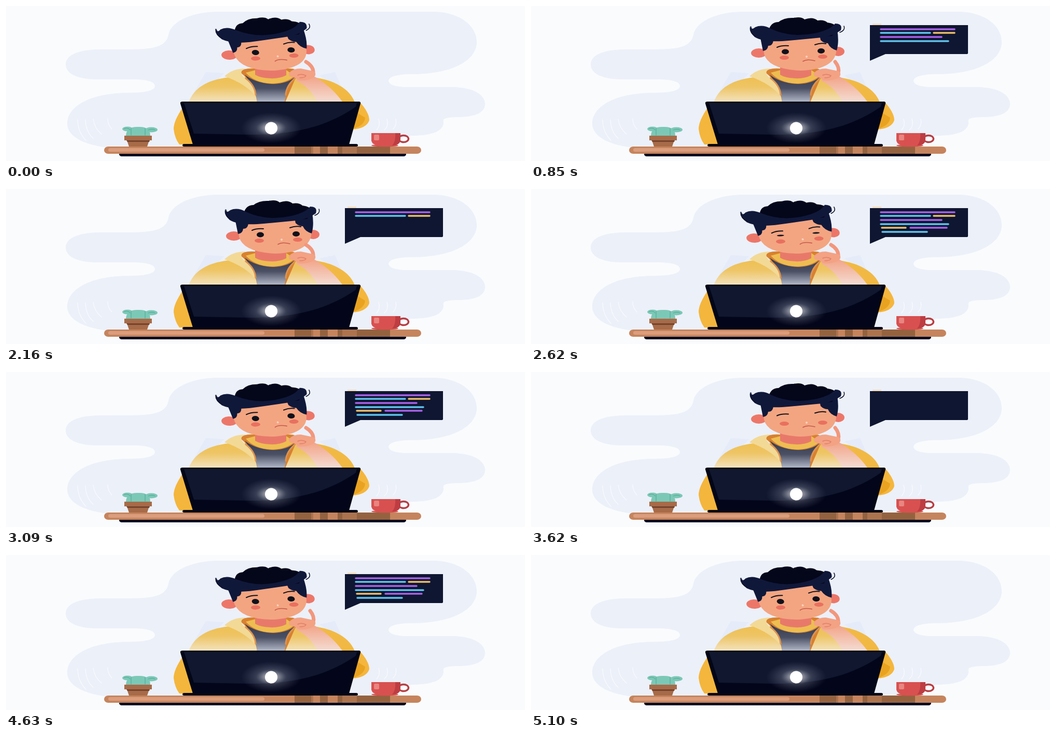
Animation, 1000 px wide and 300 px high, one loop 5170 ms. Source, as an HTML page:

```html
<!DOCTYPE html>
<html lang="en">
<head>
<meta charset="utf-8">
<title>Thinking at the laptop</title>
<style>
  html, body { margin: 0; height: 100%; overflow: hidden; background: #fafbfd; }
  svg { display: block; width: 100vw; height: 100vh; }
  .line { fill: none; stroke-linecap: round; }
</style>
</head>
<body>
<svg viewBox="0 0 1000 300" preserveAspectRatio="none">
  <defs>
    <linearGradient id="cloth" x1="0" y1="0" x2="0" y2="1">
      <stop offset="0" stop-color="#efc052"/><stop offset=".4" stop-color="#eec566"/><stop offset="1" stop-color="#f3e3c0"/>
    </linearGradient>
    <linearGradient id="shirt" x1="0" y1="0" x2="0" y2="1">
      <stop offset="0" stop-color="#34394c"/><stop offset=".5" stop-color="#4b5064"/><stop offset="1" stop-color="#b4bac9"/>
    </linearGradient>
    <linearGradient id="arm" x1="0" y1="0" x2="0" y2="1">
      <stop offset="0" stop-color="#f2a184"/><stop offset="1" stop-color="#f4dcd2"/>
    </linearGradient>
    <radialGradient id="glow">
      <stop offset=".15" stop-color="#fff" stop-opacity=".65"/>
      <stop offset=".5" stop-color="#aeb2c2" stop-opacity=".25"/>
      <stop offset="1" stop-color="#8a90a8" stop-opacity="0"/>
    </radialGradient>
  </defs>

  <!-- backdrop -->
  <path fill="#ecf0f9" d="M313 56C318 28 362 11 410 11H825C874 12 907 38 907 70C907 106 858 132 782 132
    C752 132 737 137 737 145C738 153 752 157 775 157H862C900 158 923 171 923 190C922 208 902 215 868 215
    C845 216 841 218 843 226C842 243 820 251 780 251L700 274H195C145 268 118 250 118 228C118 195 160 168 238 168
    C270 168 287 163 287 155C287 146 270 142 242 142H172C135 141 115 130 115 113C115 95 140 84 182 84H235C288 84 308 78 313 56Z"/>
  <g class="line" stroke="#fff" stroke-width="1.2" opacity=".7">
    <path d="M138 220Q138 244 154 260M153 220Q154 244 168 256M168 219Q170 236 184 248M196 218Q196 230 204 238"/>
    <path d="M714 240Q722 232 718 219M729 240Q738 232 734 219M746 238Q754 230 751 219"/>
  </g>
  <path fill="#e5ebf9" d="M385 128L420 130L370 185H352ZM634 128L604 134L655 176Z"/>

  <!-- body -->
  <path fill="#f4b63c" d="M341 196Q323 222 323 238Q325 256 334 268H366ZM680 184Q700 206 700 221Q695 237 667 239Z"/>
  <path fill="#e9a321" d="M677 207L692 216Q691 231 668 238Z"/>
  <path fill="url(#cloth)" d="M430 138C385 143 362 160 352 186H655Q620 152 590 138Z"/>
  <path fill="#f1b944" d="M592 138C632 143 662 160 672 186H648Q625 153 592 138Z"/>
  <path fill="#d8812f" d="M451 128Q458 119 480 121H545Q560 120 562 130L538 186H484Q478 150 451 128Z"/>
  <path fill="url(#shirt)" d="M460 133Q482 150 515 151Q543 150 557 137Q541 153 537 186H484Q482 163 460 133Z"/>
  <path fill="#eebd52" d="M462 129L481 124Q510 140 540 124L556 135Q540 150 511 150Q480 149 462 129Z"/>
  <path fill="#e8796a" d="M480 112H540V134Q527 141 509 140Q489 139 480 133Z"/>
  <path fill="#f3d996" d="M421 136Q436 121 462 121Q446 126 460 139Q480 154 481 175Q463 151 421 136Z"/>
  <path class="line" stroke="#dd9350" stroke-width="3" d="M462 140Q480 154 481 172M557 140Q540 154 539 172"/>

  <!-- head -->
  <g id="head">
    <ellipse cx="439" cy="91" rx="15" ry="9" fill="#ec7769"/>
    <ellipse cx="592" cy="88" rx="12" ry="9" fill="#ec7769"/>
    <path fill="#f3a581" d="M446 66Q520 44 588 62V90Q582 123 519 125Q456 122 449 92Z"/>
    <path fill="#10183a" d="M442 62L447 87Q456 86 457 77Q467 77 467 64ZM556 56L558 66Q564 72 572 72Q576 82 589 86Q594 70 590 46Z"/>
    <path fill="#04061a" d="M458 47Q462 31 477 31Q488 22 506 23Q521 20 527 26Q543 20 552 28Q565 26 571 32Q588 34 590 44L580 58L470 64Z"/>
    <path fill="#10183a" d="M425 39Q424 48 432 41Q446 35 462 44Q500 62 545 53Q576 47 586 34Q601 34 597 47Q584 57 560 61Q520 65 484 68Q448 70 431 60Q418 49 425 39Z"/>
    <path class="line" stroke="#0b1029" stroke-width="1.5" d="M423 40Q420 51 432 58M595 51Q606 47 603 39"/>
    <g fill="#e9705f">
      <ellipse cx="488" cy="100" rx="9" ry="4"/><ellipse cx="562" cy="98" rx="9" ry="4"/>
    </g>
    <g fill="#11111b">
      <ellipse class="eye" cx="490" cy="88.5" rx="7"/><ellipse class="eye" cx="559" cy="87" rx="7"/>
    </g>
    <path id="brows" class="line" stroke="#11111b" stroke-width="2" d="M474 80Q483 76 496 77M547 75Q558 71 568 73"/>
    <circle cx="531" cy="98" r="2" fill="#fbd2bc"/>
    <path class="line" stroke="#c65a4c" stroke-width="1.6" d="M524 107Q532 102 547 106"/>
  </g>

  <!-- hand -->
  <path fill="url(#arm)" d="M560 136L590 134Q626 154 648 185H600Q585 157 560 145Z"/>
  <path id="finger" class="line" stroke="#f2977d" stroke-width="7"/>
  <path fill="#f3a284" d="M545 130Q552 121 568 121L592 126Q600 131 593 138Q582 145 565 144Q556 137 546 136Z"/>
  <path class="line" stroke="#e27e6a" stroke-width="1.5" d="M562 134Q570 130 578 135Q576 139 566 139"/>

  <!-- desk -->
  <rect x="218" y="283" width="553" height="8" rx="5" fill="#050920"/>
  <rect x="189" y="272" width="611" height="14" rx="8" fill="#c5845d"/>
  <rect x="197" y="275" width="301" height="7" rx="4" fill="#db9d7c"/>
  <path fill="#94623f" d="M556 272h32v14h-32zM605 272h15v14h-15zM639 272h9v14h-9zM676 272h64v14h-64z"/>
  <path fill="#ac734e" d="M588 272h4v14h-4zM648 272h28v14h-28z"/>

  <!-- laptop -->
  <path fill="#030616" d="M340 185H680Q684 185 683 189L661 268H360L336 189Q335 185 340 185Z"/>
  <path fill="#03061a" d="M343 188H676L656 266H366Z"/>
  <path fill="#10172f" d="M343 188H676L674 195C620 232 560 249 470 249L362 247Z"/>
  <rect x="340" y="267" width="338" height="5" rx="3" fill="#030616"/>
  <ellipse cx="511" cy="236" rx="58" ry="30" fill="url(#glow)"/>
  <circle cx="511" cy="236.5" r="12" fill="#fff"/>

  <!-- plant -->
  <g fill="#7cc8b6">
    <path d="M231 251Q232 233 255 234Q278 233 278 251Z"/>
    <ellipse cx="234" cy="238" rx="10" ry="4.5"/><ellipse cx="280" cy="239.5" rx="12" ry="5"/>
  </g>
  <path class="line" stroke="#59ad9c" stroke-width="1.3" d="M241 237V250M268 237V250M228 237Q236 235 239 240M274 240Q282 237 287 240"/>
  <path fill="#a76b49" d="M228 251H281V260H276L272 272H237L233 260H228Z"/>
  <path fill="#75432c" d="M232 260H277L276 263H234Z"/>

  <!-- cup -->
  <ellipse cx="766" cy="257" rx="9.5" ry="6.5" fill="none" stroke="#b73d42" stroke-width="3.5"/>
  <ellipse cx="730" cy="270" rx="26" ry="2.5" fill="#d7504f"/>
  <path fill="#d85150" d="M704 246H760V261Q757 270 744 270H718Q706 269 704 261Z"/>
  <path fill="#bd3d42" d="M750 246H760V261Q757 270 744 270Q751 263 750 246Z"/>
  <rect x="709" y="249" width="10" height="11" rx="2" fill="#e98580"/>

  <!-- code bubble -->
  <g id="bubble">
    <path fill="#f4dfc0" d="M658 34h17v3h-17z"/>
    <path stroke="#f1eef0" d="M675 36H841"/>
    <path fill="#0f1631" d="M653 37H842V91Q842 93 839 93H683L653 106Z"/>
    <g id="code" class="line" stroke-width="3.5"></g>
  </g>
</svg>
<script>
const LOOP = 5170, HOLD = 226, STEP = 77.1, END = 5100, CYCLE = 21;
const LAST = 3 * CYCLE;
const $ = id => document.getElementById(id);
const PURPLE = '#a862e8', CYAN = '#5fc3ec', YELLOW = '#eabd68';

// x1, x2, y, colour, step of the cycle at which the stroke appears
const strokes = [
  [674, 816, 45, PURPLE, 4],
  [674, 769, 52, CYAN, 5],
  [776, 816, 52, YELLOW, 5],
  [674, 791, 60, PURPLE, 7],
  [674, 804, 68, CYAN, 9],
  [676, 722, 75, YELLOW, 11],
  [731, 801, 75, PURPLE, 11],
  [677, 763, 83, CYAN, 11]
];
$('code').innerHTML = strokes.map(([x1, x2, y, color]) =>
  `<path stroke="${color}" d="M${x1} ${y}H${x2}"/>`).join('');
const codeLines = [...$('code').children];
const eyes = document.querySelectorAll('.eye');

const show = (el, on) => el.setAttribute('visibility', on ? 'inherit' : 'hidden');
const between = (v, a, b) => v >= a && v <= b;

function stepAt(time) {
  if (time >= END) return LAST;
  return time < HOLD ? 0 : Math.min(LAST - 1, 1 + Math.floor((time - HOLD) / STEP));
}

function draw(time) {
  const step = stepAt(time), phase = step % CYCLE;

  const upright = between(phase, 1, 10);
  $('head').setAttribute('transform', upright ? '' : 'matrix(1 -.05 .2 1 -27 26)');

  // each change of pose comes with a blink
  const blink = Math.max(0, 2 - Math.min(Math.abs(phase - 3), Math.abs(phase - 12)));
  eyes.forEach(eye => eye.setAttribute('ry', [5, 1.5, 0][blink]));
  $('brows').setAttribute('transform', `translate(0 ${[0, 3, 4.5][blink]})`);

  const touching = phase === 0 || between(phase, 4, 6) || between(phase, 11, 13) || phase > 16;
  $('finger').setAttribute('d', touching ? 'M592 130Q593 117 578 108' : 'M592 130Q595 119 586 108');

  show($('bubble'), step > 0 && step < LAST);
  codeLines.forEach((line, i) => show(line, phase >= strokes[i][4]));
}

function tick() {
  draw(performance.now() % LOOP);
  requestAnimationFrame(tick);
}
tick();
</script>
</body>
</html>
```
